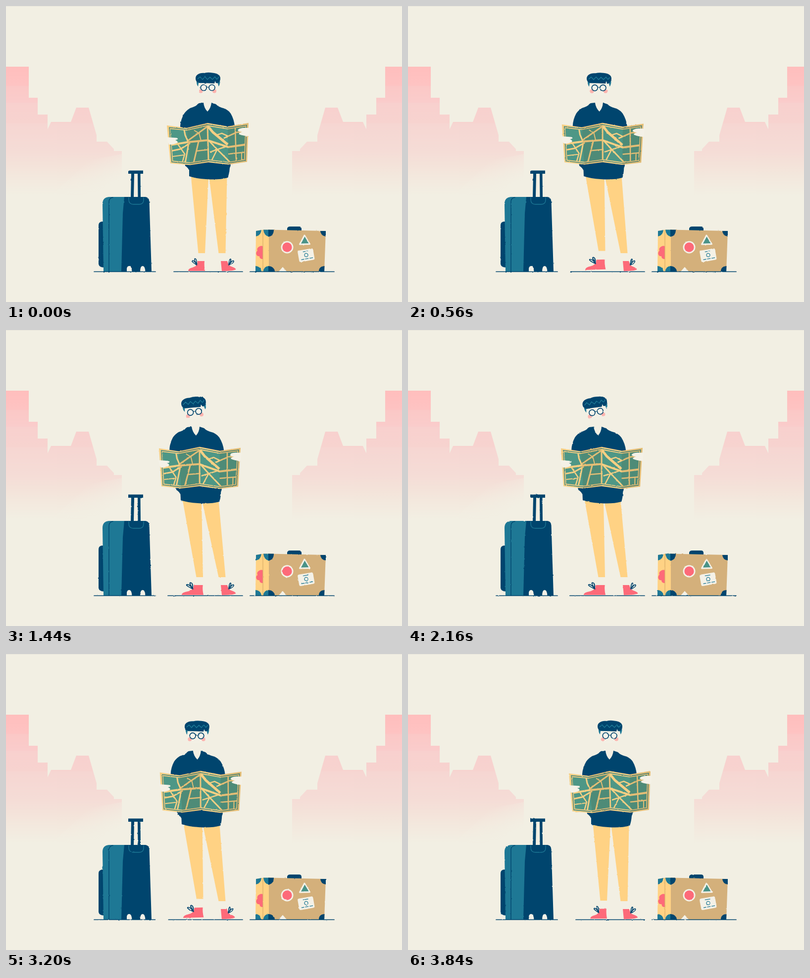
An HTML page that plays this animation: 800 px wide and 600 px high, repeating every 3.92 s.

```html
<!DOCTYPE html>
<html lang="en">
<head>
<meta charset="utf-8">
<title>Traveller with a map</title>
<style>
html, body { margin: 0; width: 100%; height: 100%; overflow: hidden; background: #f2efe3; }
svg { display: block; width: 800px; height: 600px; }
.navy { fill: #00456e; }
.teal { fill: #1e7895; }
.sun { fill: #ffd284; }
.tan { fill: #d4b07b; }
.pink { fill: #fd6a79; }
.paper { fill: #f4f1e7; }
.line { fill: none; stroke: #00456e; stroke-width: 1.7; stroke-linecap: round; }
.trim { fill: none; stroke: #1e7895; stroke-width: 1.3; }
.road { fill: none; stroke: #f6cf83; }
</style>
</head>
<body>
<svg viewBox="0 0 800 600">
  <defs>
    <linearGradient id="haze" gradientUnits="userSpaceOnUse" x1="0" y1="123" x2="0" y2="385"></linearGradient>
    <linearGradient id="fade" gradientUnits="userSpaceOnUse" x1="170" y1="312" x2="205" y2="372">
      <stop offset="0" stop-color="#f2efe3" stop-opacity="0"/>
      <stop offset="1" stop-color="#f2efe3"/>
    </linearGradient>
    <filter id="rough" filterUnits="userSpaceOnUse" x="0" y="0" width="800" height="600" color-interpolation-filters="sRGB">
      <feTurbulence id="grain" type="fractalNoise" baseFrequency=".16" numOctaves="2" seed="1"/>
      <!-- opaque noise keeps the shift centred -->
      <feColorMatrix values="1 0 0 0 0  0 1 0 0 0  0 0 1 0 0  0 0 0 0 1" result="noise"/>
      <feDisplacementMap in="SourceGraphic" in2="noise" scale="2" xChannelSelector="R" yChannelSelector="G"/>
    </filter>
    <clipPath id="sheet"><path d="M332 249.500L365 252.500L407 243.500L448 250L483.500 244.500L481 311L449 316L409 311L372 317L337.500 313.500Z"/></clipPath>
    <path id="city" d="M0 123H46V186H64V220H84V250L91 235H131L142 206H167L183 262V275H204L218 290V294H234V385H0Z"/>
  </defs>

  <rect width="800" height="600" fill="#f2efe3"/>
  <rect width="800" height="1" fill="#e8e5db"/>
  <use href="#city" fill="url(#haze)"/>
  <path d="M235 300V386H90L170 312Z" fill="url(#fade)"/>
  <use href="#city" fill="url(#haze)" transform="translate(812 0) scale(-1 1)"/>

  <g filter="url(#rough)">
    <!-- trolley -->
    <path class="navy" d="M198 437H193Q187 438 187 445V523Q188 530 198 530Z"/>
    <path class="teal" d="M208 387H244V538H197L195 401Q195 388 208 387Z"/>
    <path class="line" style="stroke-width:1.4" d="M216 388Q208 389 208 397V538"/>
    <path class="navy" d="M239 387H282Q289 388 289.500 396L294 538H233L236 420Z"/>
    <path class="navy" d="M247 333.500H277V340H271.500L272 388H266.500L266 340H259L258 388H252L253 340H247Z"/>
    <path class="trim" d="M248 388V393Q248 402 258 402H269Q278 402 278 393V388"/>
    <path class="paper" d="M244 539V532Q245 527 249 527Q254 527 254.500 539ZM271 539Q271 527 276 527Q281 527 281.500 539Z"/>
    <path class="line" d="M178 538.500H302"/>

    <!-- suitcase -->
    <path class="navy" d="M568 456V451Q569 447 574 447H592Q597 447 597 452V456Z"/>
    <path class="sun" d="M505 456L519 453.500H535V538H504Z"/>
    <path class="tan" d="M531 453.500L646 456L643 538H531Z"/>
    <path class="pink" d="M519 487Q515 485 511 488Q506 491 508 496Q504 499 506 504Q508 508 512 507Q512 513 519 513Z"/>
    <path d="M519 454V538" fill="none" stroke="#d9ae68" stroke-width="1.2"/>
    <path class="teal" d="M505 456L516 454Q515 465 505 467ZM520 453.500H532V468Q521 466 520 453.500ZM504 527Q515 528 516 538H504ZM520 538Q520 528 531 527V538Z"/>
    <path class="navy" d="M530 453.500H541Q541 466 530 467.500ZM530 527Q542 528 543 538H530ZM635 456H646V467Q636 466 635 456ZM632 538Q632 528 643.500 527L643 538Z"/>
    <circle class="paper" cx="568" cy="489" r="12.500"/>
    <circle class="pink" cx="568" cy="489" r="9.700"/>
    <path class="paper" stroke="#f4f1e7" stroke-width="3" stroke-linejoin="round" d="M603 465L613.500 482.500L593.500 483Z"/>
    <path fill="#4a9388" d="M603.500 467.500L611.500 481L596 481.500Z"/>
    <g transform="rotate(-10 606 505)">
      <rect class="paper" x="590.500" y="493.500" width="31.500" height="23.500" rx="3"/>
      <circle class="trim" cx="606.500" cy="505" r="3.500"/>
      <path class="trim" d="M601 497.500H612M595 512.500H601M603 512.500H610M612 512.500H619"/>
    </g>
    <path class="paper" d="M551 538L559 529L567 538Z"/>
    <path class="line" d="M493 538.500H663"/>
  </g>

  <g filter="url(#rough)">
    <path class="line" id="floor"/>
    <path class="sun" id="legs"/>
    <g id="footL">
      <path class="pink" d="M387 517H401Q400 526 402 537H368Q368 532 377 530Q387 527 387 517Z"/>
      <path class="line" d="M385.500 525Q374 518 376 516Q380 515 385 524Q379 512 382 512Q386 513 385 524"/>
    </g>
    <g id="footR">
      <path class="pink" d="M434 517H447Q449 526 455 528Q464 531 464.500 534Q460 537 436 537.500Z"/>
      <path class="line" d="M450 525Q451 512 454 513Q456 516 450 525Q458 514 460 517Q461 521 450 525"/>
    </g>

    <g id="torso">
      <path class="navy" d="M390 197L399 196Q400 207 407 214Q414 207 415 196L424 199Q429 205 442 208Q450 212 454 218Q461 230 462 245L453 319Q455 323 452 328Q451 340 448 348Q430 353 404 351Q384 350 370 345L370 333Q367 327 362 324L352 243Q353 230 360 218Q364 212 372 207Q385 203 387 199Z"/>
    </g>

    <g id="map">
      <path fill="#f6cf83" d="M325 242L365 247L407 237L448 244L490 237L487 316L449 321.500L409 317L372 322.500L332 319L325 242Z"/>
      <path d="M330 246.500L365 250L407 240.500L448 247.500L486 241.500L483.500 313L449 318.500L409 313.500L372 319.500L335 316Z" fill="none" stroke="#36817f" stroke-width="1.4"/>
      <g clip-path="url(#sheet)">
        <rect x="325" y="235" width="165" height="90" fill="#4e9786"/>
        <g id="roads"></g>
      </g>
      <path fill="#503000" opacity=".11" d="M365 247L407 237L409 317L372 322.500ZM448 244L490 237L487 316L449 321.500Z"/>
      <path class="paper" d="M324 266L341 267Q348 267 347 270L342 272Q348 274 346 277Q340 281 329 281Z"/>
      <path class="paper" d="M492 247L480 247Q469 248 468 252Q470 255 477 255Q469 258 471 260Q478 263 491 264Z"/>
    </g>

    <g id="head">
      <path class="paper" d="M387 152H430V164Q429 178 417 180H399Q387 178 387 164Z" opacity=".5"/>
      <path class="teal" d="M385 153H389.500L388 163Q385 160 385 153ZM427 153H432.500Q432 160 429.500 163Z"/>
      <path class="navy" d="M383 147C383 139 391 135 401 136Q408 134 417 135.500Q433 137 433 147Q433 155 427 156.500L424 156L422.500 152L421 157Q404 156 390 156Q383 154 383 147Z"/>
      <path class="trim" style="stroke-width:1.5" d="M387 148L392 143.500L397 149L402 143.500L407 149L412 144L417 149L422 143.500L426 148.500L430 144"/>
      <g fill="#fdb3ae"><circle cx="393.500" cy="172.500" r="4"/><circle cx="421" cy="172.500" r="4"/></g>
      <g class="line" style="fill:#f6f3ea">
        <circle cx="399.300" cy="165.500" r="6"/><circle cx="416" cy="165.500" r="6"/>
        <path style="stroke-width:1" d="M406 164.500H409.500"/>
      </g>
    </g>
  </g>
</svg>
<script>
const LOOP = 3920, STEP = 80;
const $ = id => document.getElementById(id);
const put = (id, name, value) => $(id).setAttribute(name, value);

// soft bands of the skyline: y and colour
const bands = [[123, 'ffbebd'], [161, 'fec3c2'], [163, 'fbc8c6'], [195, 'facccb'],
  [197, 'f8d0ce'], [237, 'f7d3cf'], [239, 'f6d6d2'], [293, 'f5dcd6'],
  [320, 'f4e2d9'], [350, 'f3e9de'], [385, 'f2efe3']];
$('haze').innerHTML = bands.map(([y, c]) =>
  `<stop offset="${(y - 123) / 262}" stop-color="#${c}"/>`).join('');

// streets: width and path
const roads = [
  [4, 'M330 282L367 276L407 272L449 286L490 280'],
  [3, 'M359 246L362 262L369 277'],
  [3, 'M366 274L406 245'],
  [2, 'M380 252L390 258L394 273'],
  [5, 'M405 240L418 256L448 281'],
  [3, 'M407 242L409 316'],
  [2.5, 'M424 262L436 258L449 264'],
  [3, 'M410 273L426 290L452 316'],
  [2.5, 'M444 285L412 296'],
  [2.5, 'M426 292L414 316'],
  [3, 'M440 268L466 256L486 254'],
  [2.5, 'M463 244L465 316'],
  [2.5, 'M449 300L486 296'],
  [2, 'M476 298V315'],
  [3, 'M333 294L352 290L372 278'],
  [2.5, 'M347 280L361 300L356 318'],
  [2, 'M337 305L359 302'],
  [3, 'M369 279L362 318'],
  [3, 'M389 275L379 318'],
  [2.5, 'M384 294L410 291']
];
$('roads').innerHTML = roads.map(([w, d]) =>
  `<path class="road" stroke-width="${w}" d="${d}"/>`).join('');

const clamp = x => Math.min(1, Math.max(0, x));
const span = (t, a, b) => clamp((t - a) / (b - a));
const ease = x => x < .5 ? 4 * x ** 3 : 1 - 4 * (1 - x) ** 3;

function draw(t) {
  const go = span(t, 88, 772), back = span(t, 2896, 3892);
  const p = ease(go) - ease(back);
  const lift = Math.sin(Math.PI * go) + Math.sin(Math.PI * back);
  const tilt = -10 * (ease(span(t, 1160, 1640)) - ease(span(t, 2320, 2800)));

  put('grain', 'seed', 1 + [720, 1760, 2720, 3760].filter(s => t >= s).length);
  put('floor', 'd', `M${339 - 12 * p} 538.5H478`);

  const hip = -17 * p, fork = -14 * p, ankle = -4 * p, low = 501 - 5.5 * lift;
  put('legs', 'd',
    `M${373.5 + hip} 343L${409 + fork} 348L${402 + ankle} ${low}H${388.5 + ankle}Z` +
    `M${410.5 + fork} 348L${446.5 + hip} 345L443.5 501H429.500Z`);

  put('footL', 'transform', `translate(${402 - 3 * p} ${537 - 4 * lift}) ` +
    `rotate(${-2 * lift}) scale(${1 + .3 * p - .06 * lift} 1) translate(-402 -537)`);
  put('footR', 'transform', `translate(434 0) scale(${1 - .08 * lift} 1) translate(-434 0)`);

  // the upper body leans: the collar travels further than the hem
  put('torso', 'transform', `matrix(1 0 ${.047 * p} 1 ${-33.2 * p} 0)`);
  put('map', 'transform', `translate(${-17 * p} ${-.3 * p}) rotate(${1.4 * p} 408 280)`);
  put('head', 'transform', `translate(${-25 * p} ${.4 * p}) rotate(${tilt} 408 180)`);
}

const start = performance.now();
function tick() {
  const t = (performance.now() - start) % LOOP;
  draw(Math.floor(t / STEP) * STEP);
  requestAnimationFrame(tick);
}
draw(0);
requestAnimationFrame(tick);
</script>
</body>
</html>
```
